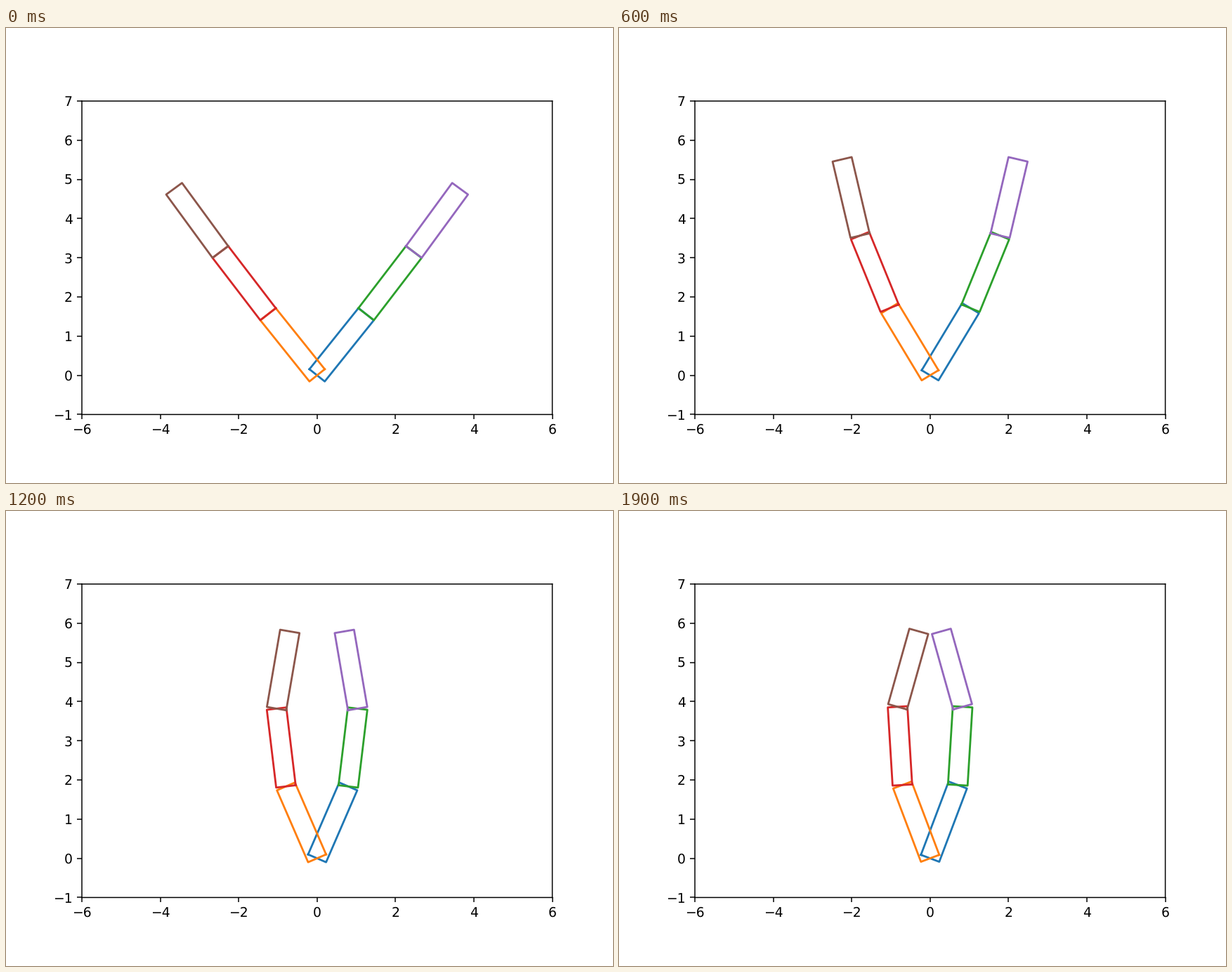
Recreate the animation shown at these times as a matplotlib script. Size 864 px wide and 648 px high, loop 2000 ms.

```python
import numpy as np
import matplotlib.pyplot as plt
from matplotlib.animation import FuncAnimation

FRAMES, INTERVAL = 20, 100
LENGTH, WIDTH = 2.0, 0.5

# Joint angles in degrees: an even closing move, then a slow settling.
START = np.array([50.0, 0.0, 0.0])
END = np.array([69.3, 17.2, 19.2])
SAG = np.array([0.0, 0.9, 1.2])
RATE = 1.275
CLOSED = 12


def pose(i):
    """Absolute angle of each link at step i, in radians."""
    joints = START + RATE * (min(i, CLOSED) + 1)
    u = max(0, i - CLOSED) / (FRAMES - 1 - CLOSED)
    joints += (END - joints) * (1 - (1 - u) ** 2)
    joints -= SAG * np.sin(np.pi * u ** 2)
    return np.radians(np.cumsum(joints))


def outlines(angles):
    """Closed outline of every link of the right-hand finger."""
    base = np.zeros(2)
    for a in angles:
        along = LENGTH * np.array([np.cos(a), np.sin(a)])
        side = WIDTH / 2 * np.array([-np.sin(a), np.cos(a)])
        tip = base + along
        yield np.array([base + side, base - side, tip - side,
                        tip + side, base + side])
        base = tip


plt.rcParams["text.hinting"] = "none"
fig, ax = plt.subplots(figsize=(6.4, 4.8), dpi=135)
ax.set_aspect("equal")
ax.set_xlim(-6, 6)
ax.set_ylim(-1, 7)
ax.set_xticks(range(-6, 7, 2))
ax.set_yticks(range(-1, 8))
for spine in ax.spines.values():
    spine.set_snap(False)

# Right and left links alternate through the default colour cycle.
lines = [ax.plot([], [], color=f"C{k}", lw=1.5)[0] for k in range(6)]


def update(i):
    for k, box in enumerate(outlines(pose(i))):
        x, y = box.T
        lines[2 * k].set_data(x, y)
        lines[2 * k + 1].set_data(-x, y)
    return lines


anim = FuncAnimation(fig, update, frames=FRAMES, interval=INTERVAL,
                     init_func=lambda: update(0), repeat=True,
                     repeat_delay=0)
plt.show()
```
